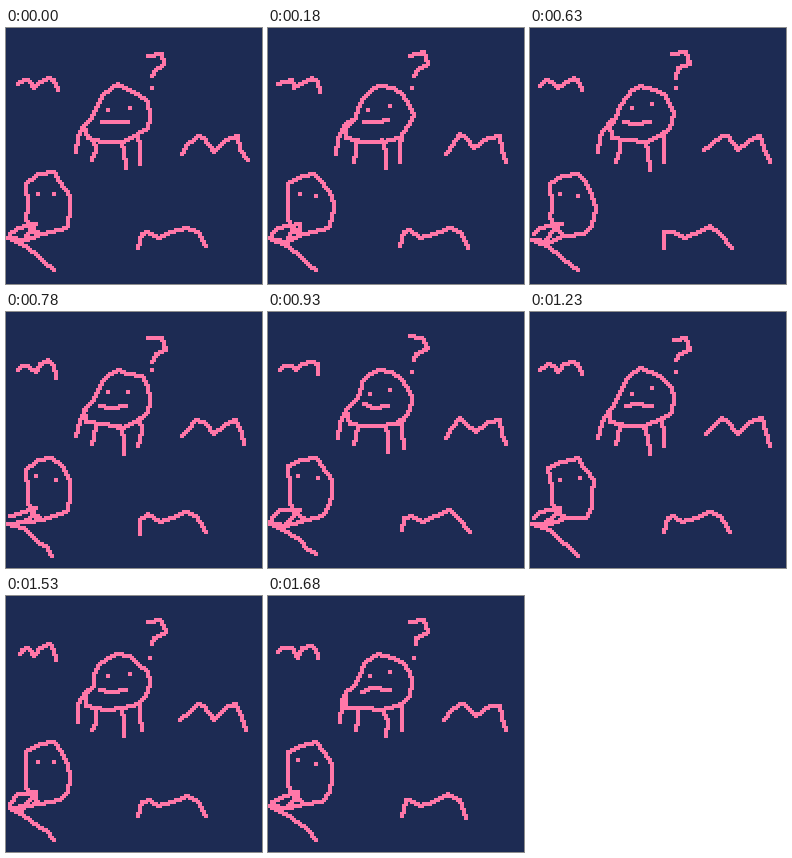
Recreate the animation shown at these times as an HTML page with a canvas. Size 256x256 px, loop 1800 ms.

```html
<!DOCTYPE html>
<html lang="en">
<head>
<meta charset="utf-8">
<title>Wobbly doodle</title>
<style>
  html, body { margin: 0; width: 100%; height: 100%; overflow: hidden; background: #1d2b53; }
  canvas { display: block; width: 100vw; height: 100vh; image-rendering: pixelated; }
</style>
</head>
<body>
<canvas id="stage" width="128" height="128"></canvas>
<script>
const ctx = document.getElementById('stage').getContext('2d');
const LOOP = 1800, FIRST = 180, STEP = 150, WOBBLE = 1.5;

// Strokes are "x,y" points on the 256 px stage; a single point is a dot.
const hills = [
  '12,58 16,53 22,53 28,60 34,53 44,49 49,53 51,64',
  '176,124 182,117 192,107 198,109 208,122 220,111 231,108 235,122 240,134',
  '133,220 136,206 142,202 153,210 166,206 181,199 191,205 200,220'
];
const question = ['142,26 155,25 160,36 149,41 146,48', '145,60'];
const thinker = [
  '111,57 124,61 134,66 141,76 144,88 141,100 132,108 116,114 98,113 80,110 78,98 87,90 90,80 95,69 104,61 111,57',
  '87,90 79,96 72,108 70,125',
  '90,114 89,124 87,133',
  '115,114 118,124 119,141',
  '133,108 134,120 134,135',
  '101,81',
  '123,78',
  '95,94 106,94 121,93'
];
const friend = [
  '20,156 32,148 48,146 55,155 63,168 64,182 62,197 54,204 36,207 25,200 21,190 20,178 20,156',
  '31,166',
  '49,167',
  '4,206 11,200 30,196',
  '30,199 23,205 17,212',
  '2,211 20,212 36,207',
  '2,211 18,217 32,229 39,234 48,243'
];
const strokes = [...hills, ...question, ...thinker, ...friend]
  .map(s => s.split(' ').map(p => p.split(',').map(Number)));

function noise(x, y, seed) {
  let h = Math.imul(x + 31, 374761393) ^ Math.imul(y + 7, 668265263) ^ Math.imul(seed + 3, 974634777);
  h = Math.imul(h ^ (h >>> 13), 1274126177);
  h = Math.imul(h ^ (h >>> 15), 2246822519);
  return ((h ^ (h >>> 16)) >>> 0) / 4294967296 - 0.5;
}

// Equal points wobble alike, so joints stay connected.
function wobble([x, y], pose) {
  return [
    Math.round(x / 2 - 1 + WOBBLE * noise(x, y, pose * 2)),
    Math.round(y / 2 - 1 + WOBBLE * noise(x, y, pose * 2 + 1))
  ];
}

function line([x0, y0], [x1, y1]) {
  const n = Math.max(Math.abs(x1 - x0), Math.abs(y1 - y0), 1);
  for (let i = 0; i <= n; i++) {
    ctx.fillRect(Math.round(x0 + (x1 - x0) * i / n), Math.round(y0 + (y1 - y0) * i / n), 2, 2);
  }
}

function draw(pose) {
  ctx.fillStyle = '#1d2b53';
  ctx.fillRect(0, 0, 128, 128);
  ctx.fillStyle = '#ff77a8';
  for (const stroke of strokes) {
    const pts = stroke.map(p => wobble(p, pose));
    pts.forEach((p, i) => line(pts[Math.max(i - 1, 0)], p));
  }
}

let shown = -1;
const start = performance.now();
function tick() {
  const t = (performance.now() - start) % LOOP;
  const pose = t < FIRST ? 0 : 1 + Math.floor((t - FIRST) / STEP);
  if (pose !== shown) draw(shown = pose);
  requestAnimationFrame(tick);
}
tick();
</script>
</body>
</html>
```
